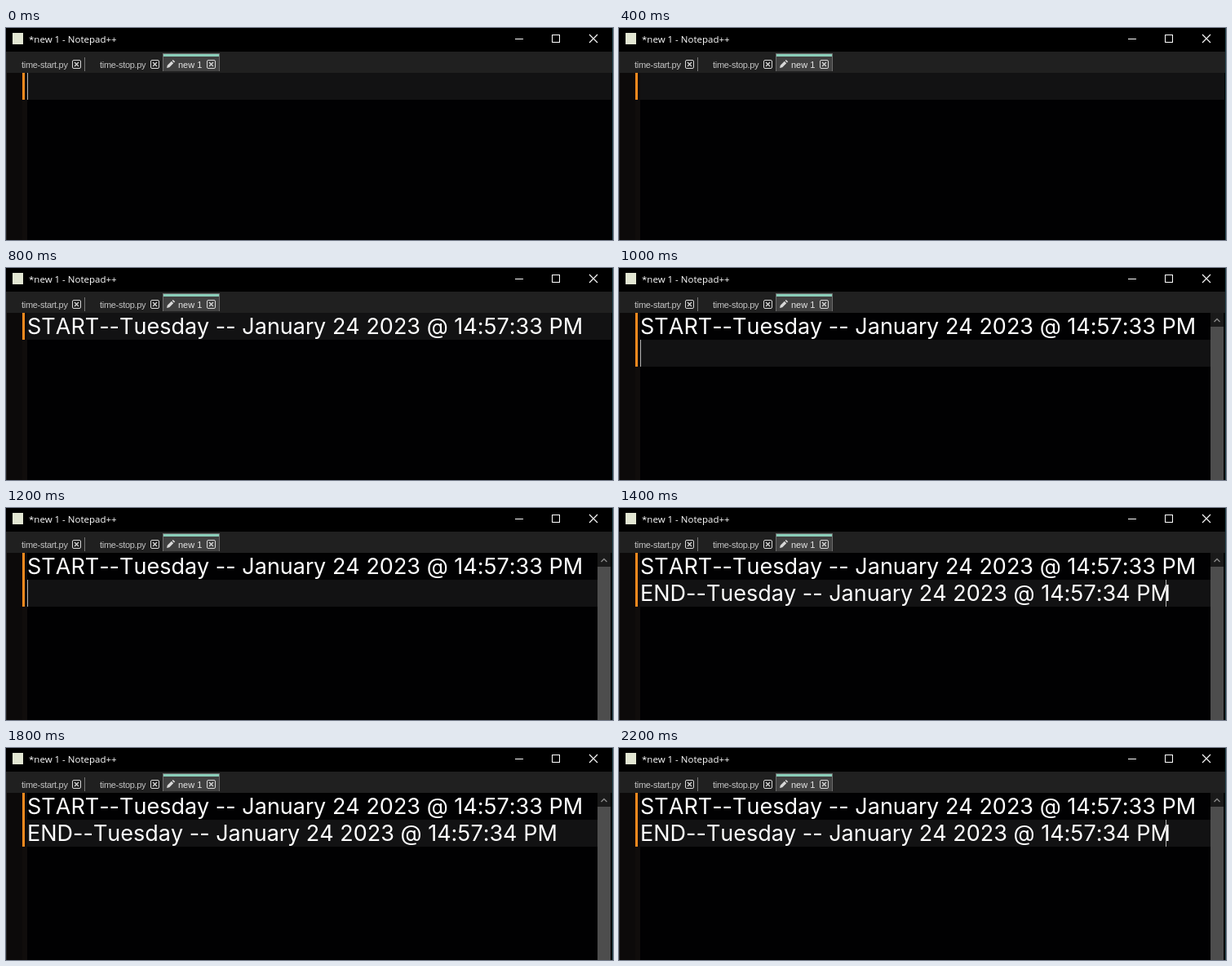
An HTML page for the animation above (3000 ms loop, 744 by 260 pixels).

```html
<!DOCTYPE html>
<html lang="en">
<head>
<meta charset="utf-8">
<title>Editor time stamps</title>
<style>
  html, body { margin: 0; width: 100%; height: 100%; overflow: hidden; background: #000; }
  svg { display: block; }
  text { white-space: pre; font-kerning: none; font-variant-ligatures: none; }
  .title { font: 11.5px "Open Sans", sans-serif; fill: #fff; }
  .tab { font: 11px "Liberation Sans", Arial, sans-serif; fill: #c4c4c4; }
  .tight { letter-spacing: -.3px; }
  .code { font: 27px Inter, sans-serif; font-kerning: none; font-variant-ligatures: none; font-optical-sizing: none; fill: #fff; }
  .line { fill: none; stroke: #fff; shape-rendering: crispEdges; }
  .close { fill: none; stroke: #d8d8d8; }
</style>
</head>
<body>
<svg width="744" height="260" viewBox="0 0 744 260">
  <defs>
    <g id="closeBox" class="close">
      <rect x=".5" y=".5" width="10" height="10" rx="1.5"/>
      <path d="M3 3L8 8M8 3L3 8" stroke-width="1.2"/>
    </g>
  </defs>

  <!-- Title bar -->
  <rect width="744" height="260"/>
  <rect x="8" y="6" width="13" height="14" fill="#e2e6d2"/>
  <text class="title" x="28" y="18">*new 1 - Notepad++</text>
  <path class="line" d="M624 13.5h10M669.5 8.5h9v9h-9z"/>
  <path d="M715 8l10 10M725 8l-10 10" fill="none" stroke="#fff" stroke-width="1.1"/>

  <!-- Tabs -->
  <rect y="29" width="744" height="26" fill="#202020"/>
  <rect x="96" y="36" width="1" height="17" fill="#777"/>
  <rect x="192" y="31" width="70" height="22" fill="#6c6c6c"/>
  <rect x="193" y="35" width="68" height="18" fill="#404040"/>
  <rect x="193" y="32" width="68" height="3" fill="#8acdb9"/>
  <text class="tab tight" x="19" y="49">time-start.py</text>
  <text class="tab tight" x="115" y="49">time-stop.py</text>
  <text class="tab" x="211" y="49" style="fill:#e4e4e4">new 1</text>
  <use href="#closeBox" x="81" y="39"/>
  <use href="#closeBox" x="177" y="39"/>
  <use href="#closeBox" x="246" y="39"/>
  <path d="M197 49l.8-3.2 5-5 2.4 2.4-5 5zM203.6 40l1.2-1.1 2.4 2.4-1.2 1.1z" fill="#d8d8d8"/>

  <!-- Editor -->
  <rect y="55" width="744" height="205" fill="#010102"/>
  <rect y="55" width="20" height="205" fill="#0c0a0a"/>
  <rect x="20" y="55" width="6" height="205" fill="#100d0c"/>
  <rect y="29" width="1" height="231" fill="#262626"/>
  <rect id="currentLine" x="26" height="33" fill="#121213"/>
  <rect id="changeBar" x="20" y="55" width="3" fill="#fa8a1e"/>
  <text id="startLine" class="code" x="26" y="81">START--Tuesday -- January 24 2023 @ 14:57:33 PM</text>
  <text id="endLine" class="code" x="26" y="114">END--Tuesday -- January 24 2023 @ 14:57:34 PM</text>
  <rect id="caret" width="1" height="33" fill="#b4b4b4"/>
  <g id="scrollbar">
    <rect x="725" y="55" width="16" height="205" fill="#4d4d4d"/>
    <rect x="725" y="55" width="16" height="17" fill="#1a1a1a"/>
    <path d="M729.5 66l3.5-3.5 3.5 3.5" fill="none" stroke="#8a8a8a" stroke-width="1.3"/>
  </g>
  <rect x="743" width="1" height="260" fill="#24464e"/>
</svg>
<script>
  const LOOP = 3000, TOP = 55, ROW = 33;
  const START_TYPED = 600, NEW_LINE = 1000, END_TYPED = 1400;
  const caretOn = [[0, 400], [NEW_LINE, 1800], [2200, LOOP]];
  const el = id => document.getElementById(id);
  const set = (id, attrs) => {
    for (const name in attrs) el(id).setAttribute(name, attrs[name]);
  };
  const show = (id, on) => set(id, { visibility: on ? 'visible' : 'hidden' });

  function draw(t) {
    const row = t < NEW_LINE ? 0 : 1;
    const y = TOP + row * ROW;
    set('currentLine', { y, width: row ? 699 : 716 });
    set('changeBar', { height: (row + 1) * ROW });
    set('caret', { x: t < END_TYPED ? 26 : 670, y });
    show('startLine', t >= START_TYPED);
    show('endLine', t >= END_TYPED);
    show('scrollbar', row === 1);
    show('caret', caretOn.some(([from, to]) => t >= from && t < to));
  }

  function tick() {
    draw(performance.now() % LOOP);
    requestAnimationFrame(tick);
  }
  tick();
</script>
</body>
</html>
```
